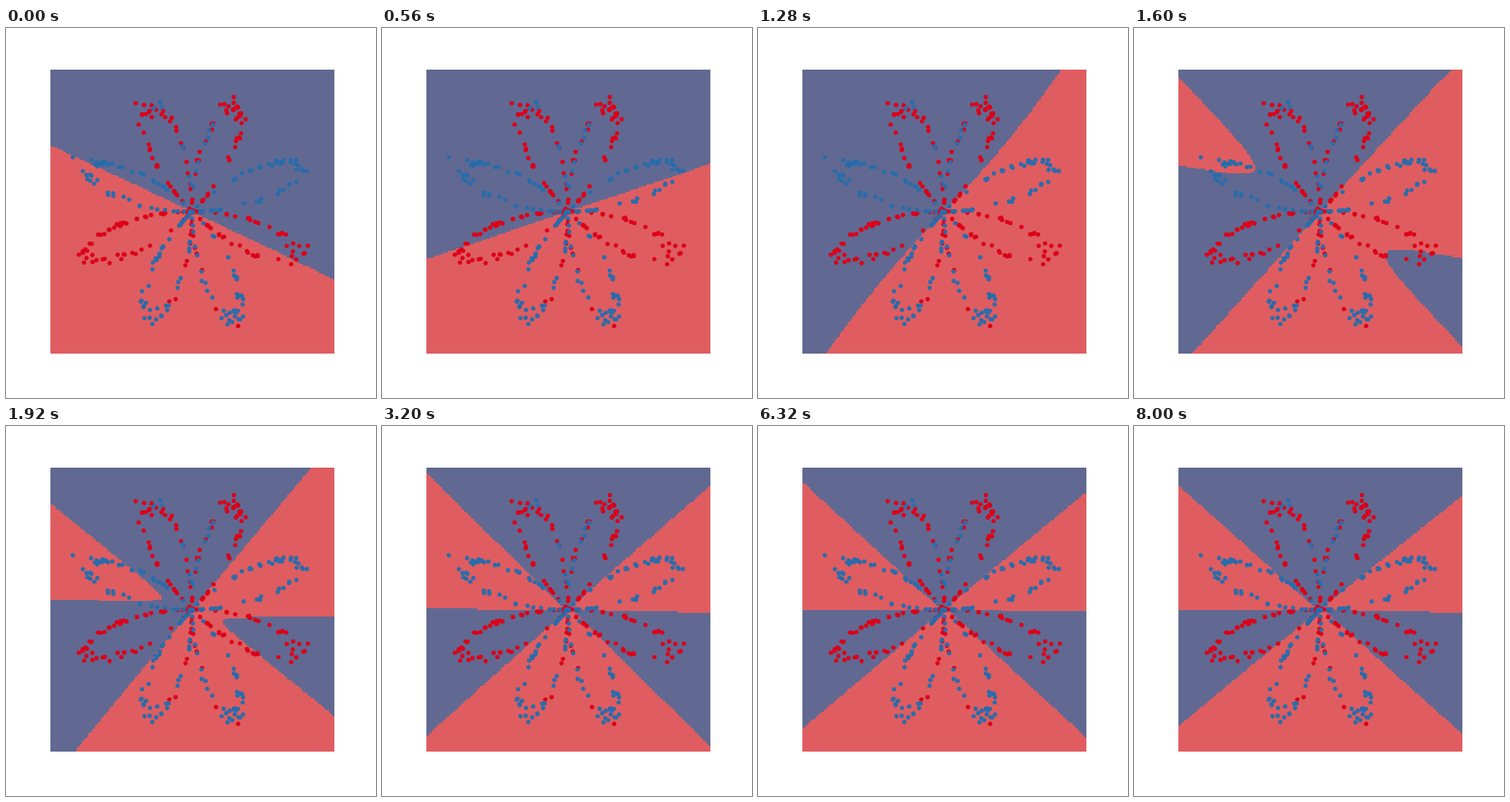
These frames come from a looping animation (400 by 400 pixels, 8.04 s). An HTML page with a canvas:

```html
<!DOCTYPE html>
<html lang="en">
<head>
<meta charset="utf-8">
<title>Decision boundary of a small network</title>
<style>
  html, body { margin: 0; height: 100%; overflow: hidden; background: #fff; }
  canvas { display: block; }
</style>
</head>
<body>
<canvas id="stage" width="400" height="400"></canvas>
<script>
const ctx = document.getElementById('stage').getContext('2d');
const LOOP = 8040, STEP = 80;
const BOX = { x: 48, y: 45, size: 307 };
const CX = 201.3, CY = 198.5, SCALE = 30.65, CELLS = 200;
const DOT = ['#dc0018', '#2a6cab'];
const REGION = [[223, 93, 96], [97, 105, 146]];

// Mersenne Twister, 53-bit doubles in [0, 1)
function twister(seed) {
  const N = 624, s = new Uint32Array(N);
  s[0] = seed;
  for (let i = 1; i < N; i++) s[i] = Math.imul(1812433253, s[i - 1] ^ (s[i - 1] >>> 30)) + i;
  let pos = N;
  const next = () => {
    if (pos === N) {
      for (let i = 0; i < N; i++) {
        const y = (s[i] & 0x80000000) | (s[(i + 1) % N] & 0x7fffffff);
        s[i] = s[(i + 397) % N] ^ (y >>> 1) ^ (y & 1 ? 0x9908b0df : 0);
      }
      pos = 0;
    }
    let y = s[pos++];
    y ^= y >>> 11;
    y ^= (y << 7) & 0x9d2c5680;
    y ^= (y << 15) & 0xefc60000;
    return (y ^ (y >>> 18)) >>> 0;
  };
  return () => {
    const high = next() >>> 5, low = next() >>> 6;
    return (high * 67108864 + low) / 9007199254740992;
  };
}

// Normal deviates by the polar method
function gaussian(random) {
  let spare = null;
  return () => {
    if (spare !== null) {
      const value = spare;
      spare = null;
      return value;
    }
    let a, b, r2;
    do {
      a = 2 * random() - 1;
      b = 2 * random() - 1;
      r2 = a * a + b * b;
    } while (r2 >= 1 || r2 === 0);
    const f = Math.sqrt(-2 * Math.log(r2) / r2);
    spare = f * a;
    return f * b;
  };
}

// Two classes of points on a noisy four-fold rose
function flower() {
  const randn = gaussian(twister(1)), n = 200, points = [];
  for (const label of [0, 1]) {
    const angles = Array.from({ length: n }, (_, i) => 3.12 * (label + i / (n - 1)) + 0.2 * randn());
    for (const t of angles) {
      const r = 4 * Math.sin(4 * t) + 0.2 * randn();
      points.push({ x: CX + SCALE * r * Math.sin(t), y: CY - SCALE * r * Math.cos(t), label });
    }
  }
  return points;
}

// step, main line angle at centre / upper end / lower end (degrees),
// wedge slopes outer / inner left / inner right, wedge corner x / y, roundness
const KEYS = [
  [0, -25.3, -25.6, -25, 1.03, -.19, -.19, 0, 110, 241],
  [5, 7, 7, 7, 1.03, -.19, -.19, 0, 110, 241],
  [11, 41, 42, 42, 1.03, -.19, -.19, 0, 110, 241],
  [12, 43, 52.7, 50.6, 1.03, -.19, -.19, 0, 110, 241],
  [15, 45, 51, 50.5, 1.03, -.19, -.19, 60, 125, 241],
  [20, 48, 47.4, 48, 1.03, -.19, -.19, 168, 173.8, 241],
  [24, 50, 50, 50.4, .81, -.018, .011, 180, 190.3, 22],
  [31, 46, 46, 46.5, .96, -.014, -.01, 193, 196, 4],
  [40, 41.4, 41.1, 41.7, .985, -.008, -.02, 198, 198.5, 1],
  [56, 40.5, 40.3, 40.8, .94, -.006, -.016, 198, 198.5, 1],
  [79, 39.8, 39.6, 40, .92, -.005, -.013, 198, 198.5, 1],
  [100, 39, 38.7, 39.4, .895, .005, -.02, 198, 198.5, 1]
];

function boundaryAt(step) {
  const i = Math.max(1, KEYS.findIndex(key => key[0] >= step));
  const from = KEYS[i - 1], to = KEYS[i];
  const k = (step - from[0]) / (to[0] - from[0]);
  const [, centre, upper, lower, outer, innerL, innerR, x, y, round] =
    from.map((v, j) => v + (to[j] - v) * k);
  const rad = Math.PI / 180;
  return { centre: centre * rad, upper: upper * rad, lower: lower * rad, outer, innerL, innerR, x, y, round };
}

function inWedge(b, inner, x, y) {
  const u = b.x - x;
  if (u <= 0) return false;
  const above = y - (b.y - b.outer * u), below = b.y + inner * u - y;
  return above > 0 && below > 0 && above * below > b.round;
}

function classify(b, x, y) {
  const dx = x - CX, dy = CY - y;
  const end = dx * Math.cos(b.centre) + dy * Math.sin(b.centre) > 0 ? b.upper : b.lower;
  const angle = b.centre + (end - b.centre) * Math.hypot(dx, dy) / 190;
  const side = dy * Math.cos(angle) > dx * Math.sin(angle);
  const flipped = inWedge(b, b.innerL, x, y) || inWedge(b, b.innerR, 2 * CX - x, 2 * CY - y);
  return side !== flipped ? 1 : 0;
}

const field = document.createElement('canvas');
field.width = field.height = CELLS;
const fieldCtx = field.getContext('2d');
const pixels = fieldCtx.createImageData(CELLS, CELLS);
const points = flower();

function draw(step) {
  const b = boundaryAt(step), cell = BOX.size / CELLS;
  for (let row = 0, p = 0; row < CELLS; row++) {
    for (let col = 0; col < CELLS; col++, p += 4) {
      const label = classify(b, BOX.x + (col + .5) * cell, BOX.y + (row + .5) * cell);
      pixels.data.set(REGION[label], p);
      pixels.data[p + 3] = 255;
    }
  }
  fieldCtx.putImageData(pixels, 0, 0);
  ctx.fillStyle = '#fff';
  ctx.fillRect(0, 0, 400, 400);
  ctx.imageSmoothingEnabled = false;
  ctx.drawImage(field, BOX.x, BOX.y, BOX.size, BOX.size);
  for (const { x, y, label } of points) {
    ctx.fillStyle = DOT[label];
    ctx.beginPath();
    ctx.arc(x, y, 2.4, 0, 2 * Math.PI);
    ctx.fill();
  }
}

const start = performance.now();
let shown = -1;
function tick() {
  const step = Math.floor((performance.now() - start) % LOOP / STEP);
  if (step !== shown) draw(shown = step);
  requestAnimationFrame(tick);
}
tick();
</script>
</body>
</html>
```
